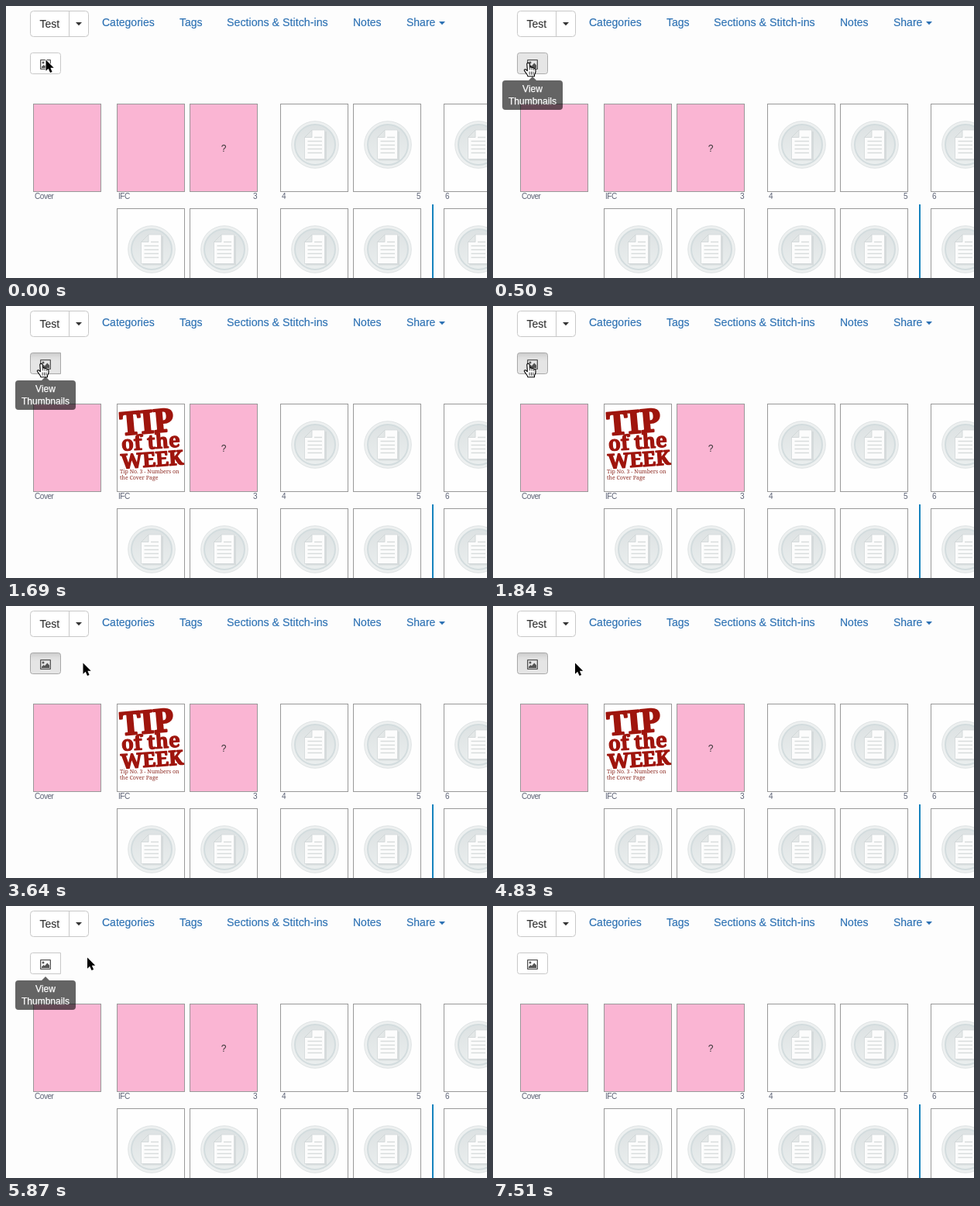
These frames come from a looping animation (621 px wide and 351 px high, 8 s). An HTML page:

```html
<!DOCTYPE html>
<html lang="en">
<head>
<meta charset="utf-8">
<title>Page plan thumbnails</title>
<style>
  html, body { margin: 0; width: 100%; height: 100%; overflow: hidden; background: #fdfdfd; }
  svg { display: block; width: 621px; height: 351px; font-family: "Liberation Sans", Arial, sans-serif; }
  .link { font-size: 14px; fill: #2b70b3; stroke: #2b70b3; stroke-width: .15; }
  .label { font-size: 10px; letter-spacing: -.45px; fill: #5c6275; }
  .tip { font-size: 12px; fill: #fff; stroke: #fff; stroke-width: .25; text-anchor: middle; }
  .slab { font-family: "Noto Serif", serif; font-weight: 700; fill: #9f150d; stroke: #9f150d; stroke-linejoin: round; }
  .small { font-family: "Noto Serif", serif; font-size: 7px; fill: #8d2a22; }
</style>
</head>
<body>
<svg viewBox="0 0 621 351" xmlns="http://www.w3.org/2000/svg">
  <defs>
    <linearGradient id="inset" x1="0" y1="0" x2="0" y2="1">
      <stop offset="0" stop-color="#cbcbcb"/>
      <stop offset=".22" stop-color="#dedede"/>
      <stop offset=".4" stop-color="#e5e5e5"/>
    </linearGradient>
    <linearGradient id="disc" x1="0" y1="0" x2="0" y2="1">
      <stop offset="0" stop-color="#dde2e3"/>
      <stop offset="1" stop-color="#eaeeee"/>
    </linearGradient>
    <g id="doc">
      <circle r="30.3" fill="#edf0f0" stroke="#dfe3e4"/>
      <circle r="26" fill="url(#disc)" stroke="#d3dcde" stroke-width="2"/>
      <path d="M-12 20.5H15V-17H-3Z" fill="#cfd5d6" opacity=".7"/>
      <path d="M-13.5 -9.5L-4 -19H12.5V18.5H-13.5Z" fill="#fcfcfc" stroke="#d2d7d8" stroke-width=".8"/>
      <path d="M-13.5 -9.5H-4V-19Z" fill="#e3e7e7" stroke="#cfd5d6" stroke-width=".8"/>
      <path d="M-1 -9.5H9M-9.5 -4.5H9M-9.5 .5H9M-9.5 5.5H9M-9.5 10.5H9" stroke="#d8dcdc" stroke-width="1.5"/>
    </g>
    <path id="arrow" d="M0 0V14.2L3.2 11.3L5.5 16.6L8.1 15.5L5.9 10.3H10.2Z"
      fill="#000" stroke="#fff" stroke-width="1.6" paint-order="stroke" stroke-linejoin="round"/>
    <g id="hand" stroke="#000" stroke-width="1.1" stroke-linejoin="round" stroke-linecap="round">
      <path fill="#fff" d="M-1.7 1.6Q-1.6 .4 0 .4Q1.5 .4 1.7 1.6L2.1 6Q3.5 5.1 4.6 6.5Q6.4 5.8 7.2 7.5Q9.3 7.1 9.5 9V12Q9 14 8 15.6V17.8H-.5Q-1 15.6 -3 13.4L-5 10.5Q-5.6 8.5 -3.6 8.7L-1.1 10.6Z"/>
      <path fill="none" stroke-width=".8" d="M2.1 6V9M4.7 6.6V9.2M7.2 7.6V9.6M1.6 12V15.4M4 12V15.4M6.3 12V15.4"/>
    </g>
  </defs>

  <rect width="621" height="351" fill="#fdfdfd"/>

  <rect x="31.5" y="6.5" width="75" height="33" rx="4" fill="#fff" stroke="#c8c8c8"/>
  <path d="M81.5 7V39" stroke="#c8c8c8"/>
  <text x="43.5" y="28" font-size="14" fill="#333" stroke="#333" stroke-width=".15">Test</text>
  <path d="M90 21H98L94 25.2Z" fill="#333"/>
  <g id="menu"></g>
  <path d="M559 20H567L563 24.2Z" fill="#2b70b3"/>

  <g id="pages"></g>
  <path d="M551 256V351" stroke="#1583bd" stroke-width="2"/>

  <g id="thumb">
    <rect x="143.5" y="126.5" width="87" height="113" fill="#fff" stroke="#999"/>
    <g class="slab">
      <text transform="translate(148.5 167) rotate(-5)" font-size="41" stroke-width="2.2">TIP</text>
      <text transform="translate(149.5 187) rotate(-4)" font-size="26" stroke-width="1.2">of the</text>
      <text transform="translate(149 210) rotate(-4)" font-size="26" stroke-width="1.4">WEEK</text>
    </g>
    <text class="small" x="147" y="216">Tip No. 3 - Numbers on</text>
    <text class="small" x="147" y="224">the Cover Page</text>
  </g>

  <g id="glow" fill="none">
    <rect x="29.5" y="58.5" width="43" height="31" rx="4.5" stroke="#cfe3fb" stroke-width="2"/>
    <rect x="31" y="60" width="40" height="28" rx="3" stroke="#5b9df0" stroke-width="2.2"/>
  </g>
  <path id="button"/>
  <g fill="#555">
    <path fill-rule="evenodd" d="M45 69H57Q58 69 58 70V81Q58 82 57 82H45Q44 82 44 81V70Q44 69 45 69ZM45.3 70.3V80.7H56.7V70.3Z"/>
    <circle cx="48" cy="73" r="1.5"/>
    <path d="M46 80V78.5L48.5 76L50 77.3L53.3 73.6L56 76.6V80Z"/>
  </g>

  <g id="tooltip">
    <path d="M51 91L56 96H86Q90 96 90 100V130Q90 134 86 134H16Q12 134 12 130V100Q12 96 16 96H46Z" fill="#000"/>
    <text class="tip" x="51" y="111">View</text>
    <text class="tip" x="51" y="127">Thumbnails</text>
  </g>
  <use id="cursor"/>
</svg>

<script>
const LOOP = 8000;
const $ = id => document.getElementById(id);

$('menu').innerHTML = [
  [124, 'Categories'], [224, 'Tags'], [285, 'Sections &amp; Stitch-ins', 14.25],
  [448, 'Notes'], [517, 'Share']
].map(([x, s, size = 14]) =>
  `<text class="link" x="${x}" y="26" style="font-size:${size}px">${s}</text>`).join('');

const page = (x, y, pink) =>
  `<rect x="${x + .5}" y="${y + .5}" width="87" height="113" fill="${pink ? '#fab5d3' : '#fefefe'}" stroke="#999"/>` +
  (pink ? '' : `<use href="#doc" x="${x + 45}" y="${y + 53}"/>`);
const label = (x, s, anchor = 'start') =>
  `<text class="label" x="${x}" y="249" text-anchor="${anchor}">${s}</text>`;
const columns = [35, 143, 237, 354, 448, 565];

$('pages').innerHTML =
  columns.map((x, i) => page(x, 126, i < 3)).join('') +
  columns.slice(1).map(x => page(x, 261, false)).join('') +
  label(37, 'Cover') + label(145, 'IFC') + label(324, '3', 'end') +
  label(356, '4') + label(535, '5', 'end') + label(567, '6') +
  '<text x="281" y="188" font-size="12" fill="#333" text-anchor="middle">?</text>';

// Each step: start time, then only the properties that change.
const steps = [
  [0, { cursor: 'arrow', x: 51.5, y: 69.5, look: 'plain', square: false, tip: 0, thumb: false }],
  [500, { cursor: 'hand', x: 45.5, y: 73, look: 'hover', tip: .6 }],
  [650, { y: 74, tip: 1 }],
  [1100, { look: 'focus' }],
  [1690, { look: 'active', square: true, tip: .6, thumb: true }],
  [1840, { square: false, tip: 0 }],
  [3640, { cursor: 'arrow', x: 99.5, y: 73.5 }],
  [3790, { x: 116, y: 75 }],
  [3940, { x: 117, y: 74.5 }],
  [4830, { x: 106, y: 73.5 }],
  [4980, { x: 57, y: 71 }],
  [5130, { cursor: 'hand', x: 52, y: 68.5, look: 'hover', tip: 1 }],
  [5270, { look: 'focus' }],
  [5870, { cursor: 'arrow', x: 105, y: 66.5, look: 'plain', square: true, tip: .6, thumb: false }],
  [6020, { x: 126, y: 67, square: false, tip: 0 }],
  [7070, { x: 395, y: 240 }],
  [7210, { x: 548.5, y: 350.3 }],
  [7510, { cursor: '' }]
];

const looks = {
  plain: ['#fff', '#c8c8c8'],
  hover: ['#e6e6e6', '#adadad'],
  active: ['url(#inset)', '#a8a8a8'],
  focus: ['url(#inset)', '#6fa5e8']
};

function stateAt(t) {
  return Object.assign({}, ...steps.filter(s => s[0] <= t).map(s => s[1]));
}

function buttonPath(square) {
  const r = square ? 0 : 3;
  return `M34.5 60.5H${70.5 - r}q${r} 0 ${r} ${r}V${87.5 - r}q0 ${r} ${-r} ${r}H34.5q-3 0 -3 -3V63.5q0 -3 3 -3Z`;
}

const show = (el, on) => el.setAttribute('visibility', on ? 'visible' : 'hidden');

function draw(t) {
  const s = stateAt(t);
  const [fill, stroke] = looks[s.look];
  const button = $('button');
  button.setAttribute('d', buttonPath(s.square));
  button.setAttribute('fill', fill);
  button.setAttribute('stroke', stroke);
  show($('glow'), s.look === 'focus');
  show($('thumb'), s.thumb);
  $('tooltip').setAttribute('opacity', s.tip);
  const cursor = $('cursor');
  show(cursor, s.cursor);
  if (s.cursor) cursor.setAttribute('href', '#' + s.cursor);
  cursor.setAttribute('transform', `translate(${s.x} ${s.y})`);
}

const start = performance.now();
function tick(now) {
  draw(Math.max(0, now - start) % LOOP);
  requestAnimationFrame(tick);
}
draw(0);
requestAnimationFrame(tick);
</script>
</body>
</html>
```
